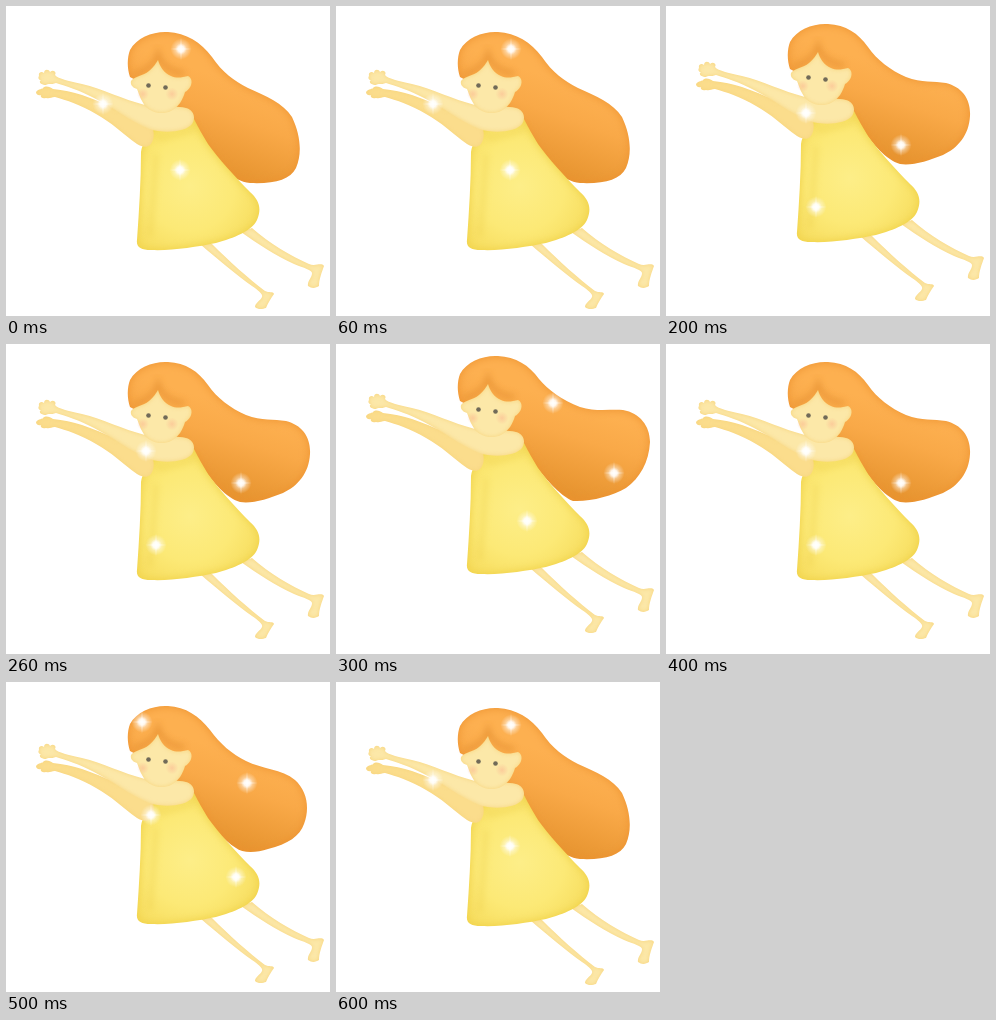
These frames come from a looping animation (324x310 px, 700 ms). An HTML page:

```html
<!DOCTYPE html>
<html lang="en">
<head>
<meta charset="utf-8">
<title>Flying girl</title>
<style>
  html, body { margin: 0; width: 100%; height: 100%; overflow: hidden; background: #fff; }
  svg { display: block; width: 324px; height: 310px; }

  .body, .pose { animation: 700ms step-end infinite; }
  .body { animation-name: bob; }
  .pose { visibility: hidden; }
  .low { animation-name: low; }
  .rise { animation-name: rise; }
  .high { animation-name: high; }
  .top { animation-name: top; }

  @keyframes bob {
    0%, 85.71% { transform: translateY(0); }
    14.28%, 71.42% { transform: translateY(-2px); }
    28.57%, 57.14% { transform: translateY(-8px); }
    42.85% { transform: translateY(-14px); }
    100% { transform: translateY(0); }
  }
  @keyframes low {
    0%, 85.71%, 100% { visibility: visible; }
    14.28% { visibility: hidden; }
  }
  @keyframes rise {
    0%, 28.57%, 85.71%, 100% { visibility: hidden; }
    14.28%, 71.42% { visibility: visible; }
  }
  @keyframes high {
    0%, 42.85%, 71.42%, 100% { visibility: hidden; }
    28.57%, 57.14% { visibility: visible; }
  }
  @keyframes top {
    0%, 57.14%, 100% { visibility: hidden; }
    42.85% { visibility: visible; }
  }

  .hair { fill: url(#hairFill); filter: url(#hairRim); }
  .fringe { fill: none; stroke: #dd8526; stroke-width: 5; opacity: .5; filter: url(#soft); }
  .skin { fill: #fce8a8; filter: url(#skinRim); }
  .far { fill: #fbdd8c; }
  .fold { fill: none; stroke: #e8c840; stroke-width: 5; stroke-linecap: round; opacity: .3; filter: url(#soft); }
</style>
</head>
<body>
<svg viewBox="0 0 324 310">
  <defs>
    <filter id="soft" x="-50%" y="-50%" width="200%" height="200%"><feGaussianBlur stdDeviation="3"/></filter>
    <filter id="blur" x="-50%" y="-50%" width="200%" height="200%"><feGaussianBlur stdDeviation=".6"/></filter>

    <!-- Inner shading: blurred outside colour kept inside the shape -->
    <filter id="hairRim" color-interpolation-filters="sRGB">
      <feFlood flood-color="#ee922f"/>
      <feComposite in2="SourceAlpha" operator="out"/>
      <feGaussianBlur stdDeviation="5"/>
      <feComposite in2="SourceGraphic" operator="atop"/>
    </filter>
    <filter id="dressRim" color-interpolation-filters="sRGB">
      <feFlood flood-color="#f0d044"/>
      <feComposite in2="SourceAlpha" operator="out"/>
      <feGaussianBlur stdDeviation="4"/>
      <feComposite in2="SourceGraphic" operator="atop"/>
    </filter>
    <filter id="skinRim" color-interpolation-filters="sRGB">
      <feFlood flood-color="#f8d47c"/>
      <feComposite in2="SourceAlpha" operator="out"/>
      <feGaussianBlur stdDeviation="2"/>
      <feComposite in2="SourceGraphic" operator="atop"/>
    </filter>

    <linearGradient id="hairFill" x1=".65" y1=".35" x2=".42" y2=".9">
      <stop offset="0" stop-color="#fdb050"/>
      <stop offset=".35" stop-color="#f9a948"/>
      <stop offset="1" stop-color="#e6932e"/>
    </linearGradient>
    <radialGradient id="dressFill" gradientUnits="userSpaceOnUse" cx="184" cy="180" r="75">
      <stop offset="0" stop-color="#fdee88"/>
      <stop offset=".6" stop-color="#fce976"/>
      <stop offset="1" stop-color="#f7de60"/>
    </radialGradient>
    <radialGradient id="glow">
      <stop offset="0" stop-color="#fff"/>
      <stop offset=".3" stop-color="#fff" stop-opacity=".9"/>
      <stop offset=".55" stop-color="#fff" stop-opacity=".4"/>
      <stop offset="1" stop-color="#fff" stop-opacity="0"/>
    </radialGradient>
    <radialGradient id="blush">
      <stop offset="0" stop-color="#fbb18c" stop-opacity=".5"/>
      <stop offset="1" stop-color="#fbb18c" stop-opacity="0"/>
    </radialGradient>
    <g id="star">
      <circle r="10.5" fill="url(#glow)"/>
      <path d="M0-12L1-1L11 0L1 1L0 12L-1 1L-11 0L-1-1Z" fill="#fff" opacity=".4"/>
    </g>
  </defs>

  <g class="pose low">
    <path class="hair" d="M124 71C121 62 121 52 124 44C131 31 148 25 162 26C180 27 195 36 206 51C216 66 228 75 242 82C260 90 277 97 286 111C295 130 296 148 290 162C284 174 268 178 244 177C226 175 213 160 203 144C195 130 185 118 178 108L150 85Z"/>
  </g>
  <g class="pose rise">
    <path class="hair" d="M124 69C121 60 121 50 124 42C131 29 148 23 162 24C180 25 193 34 204 48C214 62 226 72 240 79C256 87 276 87 289 98C301 109 304 126 298 142C294 154 282 162 262 167C250 171 236 171 230 166C217 158 205 143 197 130L178 106L150 83Z"/>
  </g>
  <g class="pose high">
    <path class="hair" d="M124 63C121 54 121 44 124 36C131 23 148 17 162 18C180 19 192 27 202 41C211 54 224 64 240 71C256 77 268 75 280 77C296 81 305 93 304 110C303 129 292 142 277 149C262 155 246 160 234 158C220 154 206 137 198 125L178 100L150 77Z"/>
  </g>
  <g class="pose top">
    <path class="hair" d="M124 57C121 48 121 38 124 30C131 17 148 11 162 12C180 13 193 21 203 35C212 46 226 56 244 63C260 68 274 65 287 66C304 69 314 82 314 98C313 118 304 134 290 144C276 152 254 158 237 157C224 152 208 133 198 120L178 94L150 71Z"/>
  </g>

  <g class="body">
    <!-- legs -->
    <path class="skin" d="M194 238C210 252 232 270 246 280C253 285 257 288 256 291C254 295 249 297 249 301C252 304 257 303 260 302C262 297 265 292 268 288C267 285 263 287 259 285C243 273 223 255 206 238Z"/>
    <path class="skin" d="M235 226C252 238 270 250 288 258C298 262 306 264 306 267C306 272 301 275 302 280C306 283 310 282 313 280C313 273 316 266 318 260C315 256 309 261 303 258C285 250 264 238 246 222Z"/>

    <!-- dress -->
    <path fill="url(#dressFill)" filter="url(#dressRim)" d="M147 122C143 130 136 137 135 146C135 175 133 205 131 234C130 241 135 244 145 244C165 245 190 241 210 237C228 232 246 225 251 214C256 202 253 194 244 186C230 172 212 152 202 138C197 130 192 121 188 113Z"/>
    <path class="fold" d="M152 132C168 130 180 126 188 121M150 150C148 180 146 205 144 228"/>

    <!-- arms -->
    <path class="skin far" d="M30 86C33 82 36 84 37 82C40 79 44 81 47 83C57 84 67 86 76 89C97 96 124 109 146 121C149 127 148 135 144 139C141 142 136 141 131 138C117 128 105 116 90 108C75 99 60 94 49 91C45 91 44 93 40 92C36 93 34 91 35 89C32 90 30 88 30 86Z"/>
    <path class="skin" d="M33 70C32 66 36 65 38 67C38 63 43 63 44 66C47 63 51 66 49 69C52 73 64 75 76 78C97 83 116 93 139 99C155 103 168 99 180 102C188 104 190 112 186 118C180 126 158 128 143 123C125 116 108 102 88 92C73 84 60 80 50 77C45 79 42 77 40 79C35 79 32 76 35 74C32 74 32 71 33 70Z"/>

    <!-- face -->
    <path class="fringe" d="M128 68C138 66 148 60 152 48C156 60 164 66 178 67"/>
    <path class="skin" d="M125 75C129 70 137 70 143 65C148 61 150 57 152 54C154 61 158 67 165 70C171 73 177 71 182 70C188 73 186 82 179 86C177 93 173 101 165 105C157 109 146 107 140 101C135 95 133 88 131 83C127 82 124 79 125 75Z"/>
    <circle cx="137" cy="88" r="6" fill="url(#blush)"/>
    <circle cx="166" cy="88" r="6.5" fill="url(#blush)"/>
    <g fill="#716a58" filter="url(#blur)">
      <circle cx="142.5" cy="79.5" r="2.3"/>
      <circle cx="159.5" cy="81.5" r="2.3"/>
    </g>
  </g>

  <g class="pose low">
    <use href="#star" x="175" y="43"/>
    <use href="#star" x="97" y="98"/>
    <use href="#star" x="174" y="164"/>
  </g>
  <g class="pose rise">
    <use href="#star" x="136" y="40"/>
    <use href="#star" x="241" y="101"/>
    <use href="#star" x="145" y="133"/>
    <use href="#star" x="230" y="195"/>
  </g>
  <g class="pose high">
    <use href="#star" x="140" y="107"/>
    <use href="#star" x="235" y="139"/>
    <use href="#star" x="150" y="201"/>
  </g>
  <g class="pose top">
    <use href="#star" x="217" y="59"/>
    <use href="#star" x="278" y="129"/>
    <use href="#star" x="191" y="177"/>
  </g>
</svg>
</body>
</html>
```
